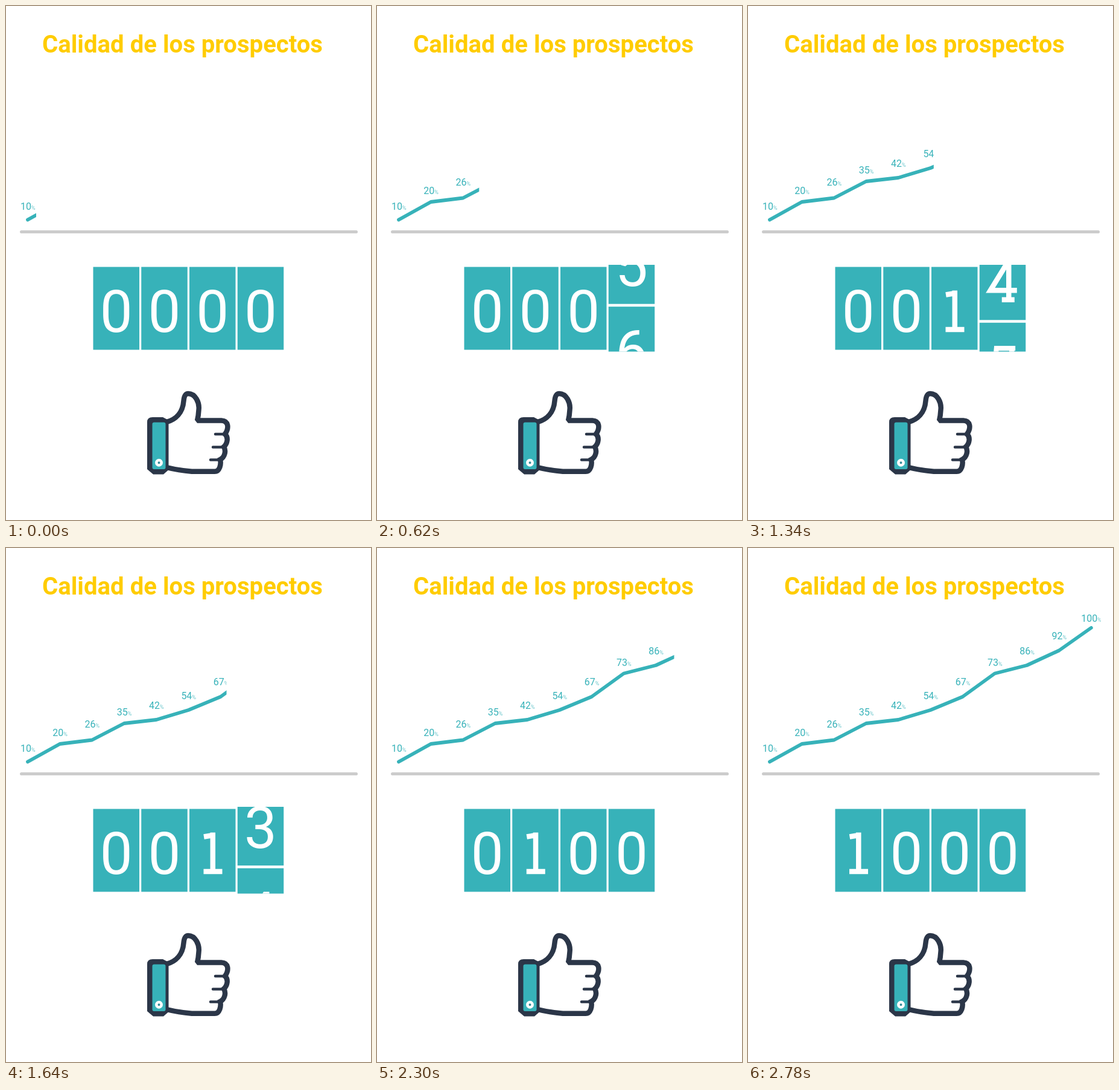
These frames come from a looping animation (605x850 px, 3200 ms). An HTML page:

```html
<!DOCTYPE html>
<html lang="es">
<head>
<meta charset="utf-8">
<style>
  html, body { margin: 0; width: 100%; height: 100%; overflow: hidden; background: #fff; }
  svg { display: block; }
  text { font-family: Roboto, sans-serif; }
</style>
</head>
<body>
<svg width="605" height="850" viewBox="0 0 605 850">
  <defs>
    <clipPath id="reveal"><rect id="shade" width="50" height="365"/></clipPath>
    <clipPath id="window"><rect x="144" y="428" width="317" height="143.5"/></clipPath>
  </defs>
  <text x="60" y="76.5" font-size="40.1" font-weight="700" fill="#fc0">Calidad de los prospectos</text>
  <g id="chart" clip-path="url(#reveal)" fill="#37b2b9" text-anchor="middle" font-size="16"></g>
  <path d="M25.5 373.5H580.5" stroke="#ccc" stroke-width="5" stroke-linecap="round"/>
  <g id="counter" clip-path="url(#window)" text-anchor="middle" font-size="96"></g>

  <!-- thumb: hand, fingers, cuff, button -->
  <g fill="none" stroke="#2b3648" stroke-width="8.5" stroke-linecap="round" stroke-miterlimit="1.6">
    <path d="M266 688C281 684 293 673 294.5 653C295.5 643 298 641 302 641C314 641 321 656 319.5 668Q319 678 317 685.5H357C369 686 370 698 363 708C369 713 367 724 361 729C365 735 363 746 355 750C357 758 354 769.8 346 769.8H308Q286 768 266 763"/>
    <path d="M347 708H362M343 729.5H360M339 750.5H356" stroke-width="4.5"/>
  </g>
  <path d="M243 680H260L269.5 685V767L261 774.5H244L234 766V688Q234 680 243 680Z" fill="#2b3648"/>
  <rect x="242.5" y="688.5" width="22" height="77.5" rx="3" fill="#37b2b9"/>
  <circle cx="253.5" cy="755.3" r="4.2" fill="#2f8b98" stroke="#fff" stroke-width="4.5"/>
</svg>
<script>
const $ = id => document.getElementById(id);

const percents = [10, 20, 26, 35, 42, 54, 67, 73, 86, 92, 100];
const heights = [353.5, 324, 317.5, 290, 284, 268, 246, 207.5, 194, 169.5, 132];
const px = i => 36 + i * 53.28;

// Labels sit higher over a valley of the line and lower over a peak.
function labelY(i) {
  const y = heights[i];
  const next = heights[i + 1] ?? y;
  const before = heights[i - 1] ?? 2 * y - next;
  return y - 16.5 - .17 * (2 * y - before - next);
}
$('chart').innerHTML =
  `<polyline points="${heights.map((y, i) => [px(i), y])}" fill="none" stroke="#37b2b9"
    stroke-width="5.8" stroke-linecap="round" stroke-linejoin="round"/>` +
  percents.map((n, i) =>
    `<text x="${px(i) + .3}" y="${labelY(i)}">${n}<tspan font-size="9" font-weight="300">%</tspan></text>`).join('');

// Slab details added to the plain digits; 1 and 4 are drawn whole.
const slabs = {
  1: 'M24 46L39 43.5M38.8 39V107M23.5 103.5H54.5',
  2: 'M56.2 92V107',
  4: 'M62 88H18L47 41M48.5 39V107M37 103.5H58',
  5: 'M53.5 40V55',
  7: 'M20 40V55'
};
const PITCH = 141.5;
const card = (_, i) => {
  const d = i % 10;
  return `<g transform="translate(0 ${i * PITCH})">
    <rect width="76.5" height="137" fill="#37b2b9"/>
    ${d == 1 || d == 4 ? '' : `<text x="38.25" y="107.5" fill="#fff">${d}</text>`}
    <path d="${slabs[d] || ''}" fill="none" stroke="#fff" stroke-width="8.5"/></g>`;
};
const reel = Array.from({ length: 11 }, card).join('');
$('counter').innerHTML = `<g>${reel}</g>`.repeat(4);
const reels = [...$('counter').children];

// Digits rolled by time t when n of them pass evenly from a to b.
const roll = (t, a, b, n) => n * Math.min(1, Math.max(0, (t - a) / (b - a)));
const TEN = 1120, HUNDRED = 2199, THOUSAND = 2780;
const carry = (t, end) => roll(t, end - 60, end, 1);
const last = (t, n) => roll(t, 2300, THOUSAND, n);
const positions = [
  t => carry(t, THOUSAND),
  t => carry(t, HUNDRED) + last(t, 9),
  t => carry(t, TEN) + roll(t, 1742.5, HUNDRED, 9) + last(t, 10),
  t => roll(t, 0, TEN, 10) + roll(t, 1194.4, HUNDRED, 30) + last(t, 20)
];

const start = performance.now();
function draw() {
  const loop = (performance.now() - start) % 3200;
  const t = Math.min(THOUSAND, Math.floor(loop / 20) * 20);
  $('shade').setAttribute('width', 50 + t * .1924);
  reels.forEach((el, i) => {
    const y = 431.5 - positions[i](t) % 10 * PITCH;
    el.setAttribute('transform', `translate(${144.5 + i * 79.75} ${y})`);
  });
  requestAnimationFrame(draw);
}
draw();
</script>
</body>
</html>
```
